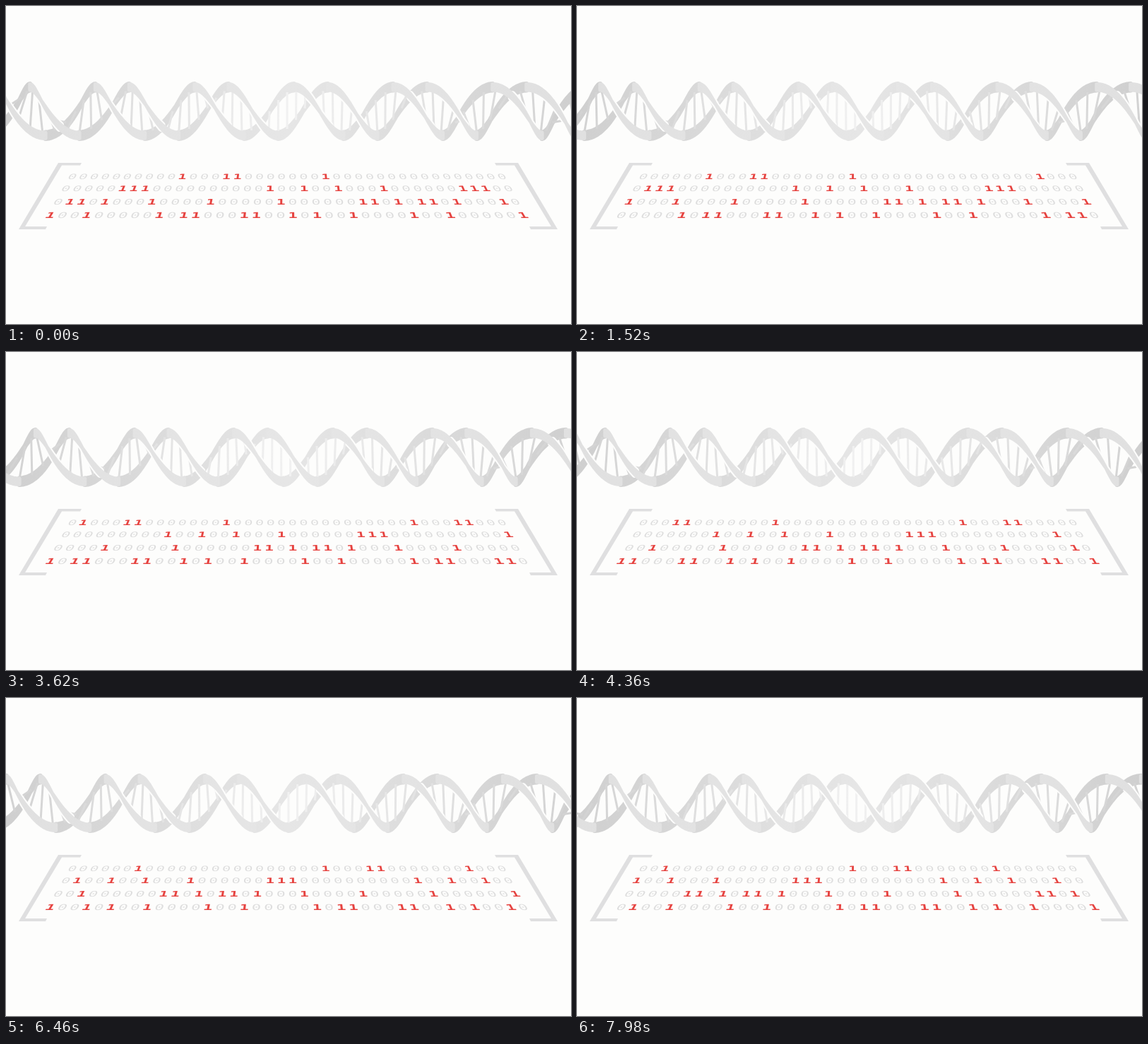
Recreate the animation shown at these times as an HTML page with a canvas. Size 800x450 px, loop 8 s.

```html
<!DOCTYPE html>
<html lang="en">
<head>
<meta charset="utf-8">
<title>Helix and binary matrix</title>
<style>
  html, body { margin: 0; width: 100%; height: 100%; overflow: hidden; background: #fdfdfc; }
  canvas { display: block; width: 800px; height: 450px; }
</style>
</head>
<body>
<canvas id="stage" width="800" height="450"></canvas>
<script>
const ctx = document.getElementById('stage').getContext('2d');
const BACKGROUND = '#fdfdfc';
const TAU = 2 * Math.PI;

// Helix geometry, in pixels; each strand is a band between two radii
const PITCH = 140.6, OUTER = 38.5, INNER = 30, THICKNESS = 5, CAMERA = 1200;
const CENTER_X = 400, CENTER_Y = 149;
const STEPS_PER_TURN = 48, RUNGS_PER_TURN = 11;
const STRAND_OFFSETS = [0, -48];

// Binary matrix: every row repeats after 30 digits
const COLUMNS = 40, REPEAT = 30, STEPS_PER_SHIFT = 8;
const ROWS = [
  { y: 241, left: 94, right: 702, ones: [10, 14, 15, 23] },
  { y: 258, left: 85, right: 711, ones: [5, 6, 7, 18, 21, 24, 28] },
  { y: 277, left: 74, right: 721, ones: [1, 2, 4, 8, 13, 19, 26, 27, 29] },
  { y: 296, left: 63, right: 732, ones: [0, 3, 9, 11, 12, 16, 17, 20, 22, 25] }
];

// The two ends of the helix are darker than its middle
function sideShade(edge, middle) {
  const gradient = ctx.createLinearGradient(0, 0, 800, 0);
  gradient.addColorStop(0, edge);
  gradient.addColorStop(0.5, middle);
  gradient.addColorStop(1, edge);
  return gradient;
}
const FRONT = sideShade('#e0e0e0', '#e6e6e6');
const BACK = sideShade('#cfcfcf', '#e6e6e6');
const RUNG = sideShade('#d2d2d2', '#f1f1f1');

// Point on the helix; angle 0 is the top, a quarter turn is nearest
function project(x, angle, radius) {
  const scale = CAMERA / (CAMERA - radius * Math.sin(angle));
  return [CENTER_X + (x - CENTER_X) * scale, CENTER_Y - radius * Math.cos(angle) * scale];
}

function trace(points) {
  ctx.beginPath();
  for (const point of points) ctx.lineTo(...point);
}

function bandEdge(peak, from, to, radius) {
  const points = [];
  for (let i = 0; i <= 24; i++) {
    const angle = from + (to - from) * i / 24;
    points.push(project(peak + angle / TAU * PITCH, angle, radius));
  }
  return points;
}

function drawBand(peak, start, end, color, thickness) {
  trace([...bandEdge(peak, start, end, OUTER), ...bandEdge(peak, end, start, INNER)]);
  ctx.closePath();
  ctx.fillStyle = ctx.strokeStyle = color;
  ctx.lineWidth = thickness;
  ctx.fill();
  ctx.stroke();
}

function drawHelix(step) {
  const first = 315 - (step - 1) % STEPS_PER_TURN * PITCH / STEPS_PER_TURN;
  const peaks = [];
  for (let turn = -4; turn <= 6; turn++) {
    for (const offset of STRAND_OFFSETS) peaks.push(first + offset + turn * PITCH);
  }
  ctx.lineJoin = 'round';
  for (const peak of peaks) drawBand(peak, -Math.PI, 0, BACK, THICKNESS + 2);

  ctx.strokeStyle = RUNG;
  ctx.lineWidth = 3;
  for (let i = -4 * RUNGS_PER_TURN; i < 6 * RUNGS_PER_TURN; i++) {
    const distance = (i + 0.5) * PITCH / RUNGS_PER_TURN;
    trace(STRAND_OFFSETS.map(offset =>
      project(first + distance, (distance - offset) / PITCH * TAU, INNER)));
    ctx.stroke();
  }

  for (const peak of peaks) {
    drawBand(peak, 0.9, Math.PI - 0.9, BACKGROUND, THICKNESS + 4);
    drawBand(peak, 0, Math.PI, FRONT, THICKNESS);
  }
}

function drawBrackets() {
  const shape = [[74, 222], [107, 222], [105, 225.5], [79, 225.5],
                 [27, 312], [58, 312], [56, 316], [18, 316]];
  ctx.fillStyle = '#dfdfe0';
  trace(shape);
  ctx.fill();
  trace(shape.map(([x, y]) => [799 - x, y]));
  ctx.fill();
}

function drawMatrix(step) {
  const shift = Math.floor(step / STEPS_PER_SHIFT);
  ctx.textAlign = 'center';
  for (const row of ROWS) {
    const cell = (row.right - row.left) / (COLUMNS - 1);
    const scale = cell / 16.4;
    for (let column = 0; column < COLUMNS; column++) {
      const x = row.left + column * cell;
      const isOne = row.ones.includes((column + shift) % REPEAT);
      const slant = (x - 398) * 0.0018;
      const height = 0.54 * scale;
      ctx.setTransform(1.06 * scale, 0, slant * height, height, x, row.y);
      ctx.font = (isOne ? 'bold ' : '') + '20px "DejaVu Sans Mono", monospace';
      ctx.fillStyle = isOne ? '#e64340' : '#dedede';
      ctx.fillText(isOne ? '1' : '0', 0, 7.3);
    }
  }
  ctx.resetTransform();
}

// Three steps every 140 ms, the last of them held for 100 ms
function stepAt(time) {
  const clock = time + 20;
  const phase = clock % 140;
  return 3 * Math.floor(clock / 140) + (phase < 20 ? 0 : phase < 40 ? 1 : 2);
}

function render() {
  const step = stepAt(performance.now() % 8000);
  ctx.fillStyle = BACKGROUND;
  ctx.fillRect(0, 0, 800, 450);
  drawHelix(step);
  drawBrackets();
  drawMatrix(step);
  requestAnimationFrame(render);
}
render();
</script>
</body>
</html>
```
